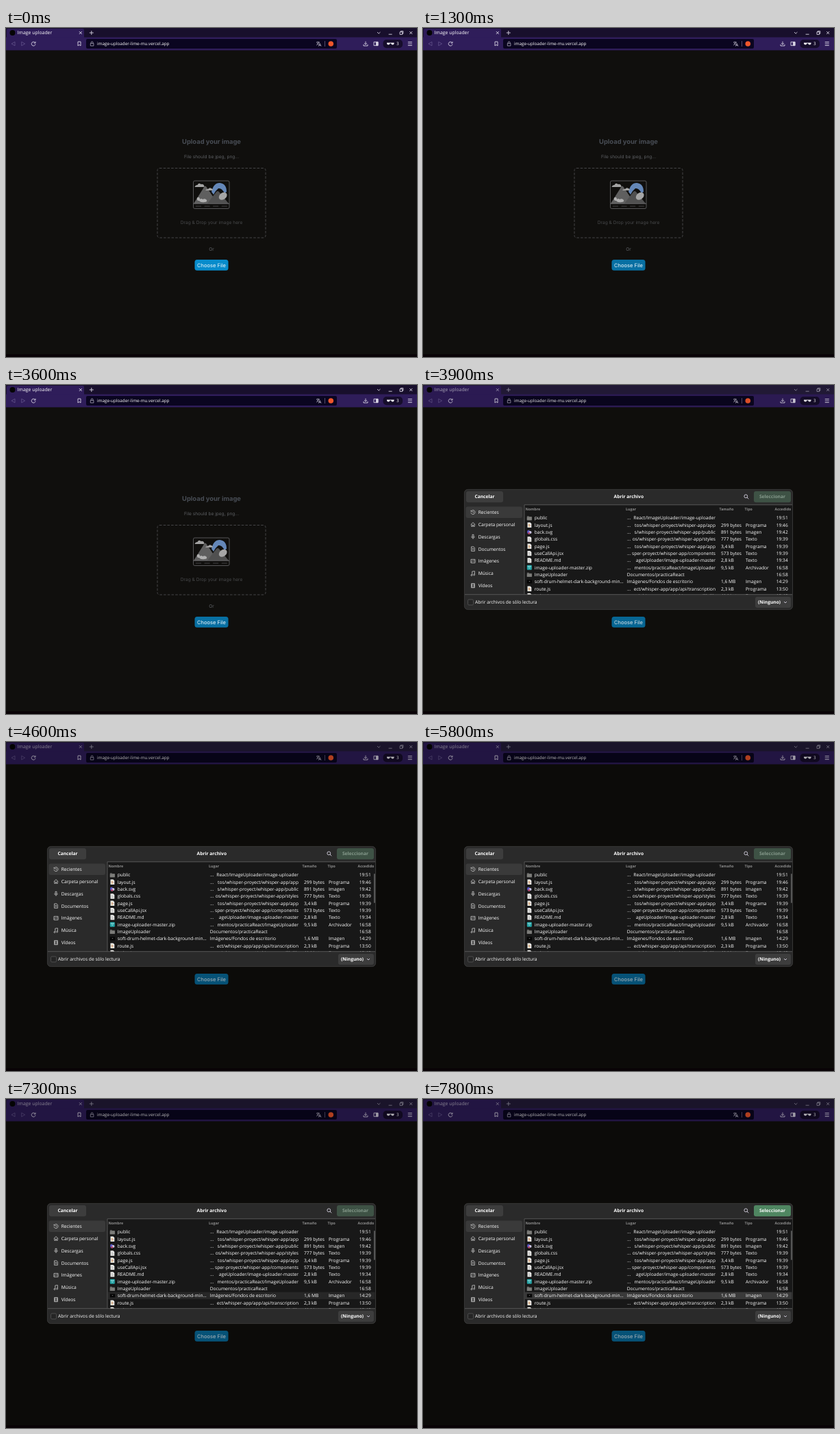
These frames come from a looping animation (600x480 px, 8000 ms). An HTML page:

```html
<!DOCTYPE html>
<html lang="es">
<head>
<meta charset="utf-8">
<title>Image uploader</title>
<style>
html, body { margin: 0; width: 100%; height: 100%; overflow: hidden; background: #100f0d; }
svg { display: block; width: 600px; height: 480px; }
text { font: 500 6.7px "Open Sans", "Noto Sans", sans-serif; text-rendering: geometricPrecision; fill: #fff; }
.bold { font-weight: 700; }
.head { font-size: 5.3px; font-weight: 700; fill: #8c8c8c; }
.page text { font: 6.6px Inter, sans-serif; text-anchor: middle; fill: #5d5f63; }
.mid { text-anchor: middle; }
.end { text-anchor: end; }
.line { fill: none; stroke: #d8d4e4; stroke-width: .9; }
.side .line { stroke: #c8c8c8; stroke-width: .8; }
</style>
</head>
<body>
<svg viewBox="0 0 600 480">
  <defs>
    <clipPath id="list"><rect x="148" y="175" width="391" height="130.5"/></clipPath>
    <g id="folder"><path d="M0 1h2.6l.8 .8H7V7H0Z" fill="#6a6a68"/><path d="M0 2.8h7V7H0Z" fill="#7d7d7a"/></g>
    <g id="doc"><path d="M.7 0h4l1.8 1.8V7.4H.7Z" fill="#ececea"/><path d="M2 2.4h2M2 3.9h3.2M2 5.4h3.2" stroke="#9a9a9a" stroke-width=".6"/></g>
    <g id="script"><path d="M.7 0h4l1.8 1.8V7.4H.7Z" fill="#ececea"/><path d="M2 2.6h2M2 5.6h2.4" stroke="#d8a13c" stroke-width=".8"/><path d="M2 4.1h3.2" stroke="#b5593f" stroke-width=".7"/></g>
    <g id="vector"><path d="M.4 1.6 3.6 .6V6.6L.4 5.4Z" fill="#5a55c8"/><circle cx="4.7" cy="4" r="2" fill="#c9c6e6"/><circle cx="3" cy="5.3" r="1.5" fill="#b8486a"/></g>
    <g id="zip"><rect y=".2" width="7" height="7" rx="1" fill="#23a3a5"/><path d="M1 2.4h5M2.6 4.6h1.8" stroke="#d4f2f0" stroke-width=".8"/></g>
    <g id="thumb"><rect y="1.2" width="7.4" height="5" fill="#050505"/><path d="M3 3.4h1.4" stroke="#999" stroke-width=".8"/></g>
  </defs>

  <rect width="600" height="480" fill="#100f0d"/>
  <rect y="476" width="600" height="4" fill="#090306"/>

  <!-- browser bar -->
  <rect id="strip" width="600" height="14"/>
  <path d="M1 14V3q0-2 2-2H112q2 0 2 2V14Z" fill="#2f1d5a"/>
  <rect y="13.5" width="600" height="19" fill="#2f1d5a"/>
  <rect x="117" y="16" width="366" height="14" rx="2" fill="#0a0520"/>
  <circle cx="9.5" cy="7" r="4" fill="#050505"/>
  <text id="tab" x="16.6" y="9.4" style="font-size:6.9px">Image uploader</text>
  <text x="133" y="25.2" style="font-size:6.35px">image-uploader-lime-mu.vercel.app</text>
  <g class="line">
    <path d="M13 20.2v5.6L8 23ZM22.7 20.2v5.6l5-2.8Z" stroke="#64558c" stroke-width=".8"/>
    <path d="M42.6 21.6A2.9 2.9 0 1 0 43 23.6M43 19.8v2.2h-2.3"/>
    <path d="M105 20h4v6l-2-1.6-2 1.6Z"/>
    <path d="M123.3 22.4h4.6v3.6h-4.6ZM124.2 22.4v-1.2a1.4 1.4 0 0 1 2.8 0v1.2" stroke="#a9a5b8" stroke-width=".8"/>
    <path d="M453 20.8h5M455.5 19.8v1M457 21q-1 2.6-3.8 4M454 21.8q1 1.7 2.6 2.5M456.4 26.6l1.8-4 1.8 4M457 25.3h2.4" stroke-width=".7"/>
    <path d="M465.5 19v8" stroke="#686080" stroke-width=".8"/>
    <path d="M525 19.6v4.2M523 22.2l2 2 2-2M522 24v2h6v-2"/>
    <path d="M537 20.4h6v5.2h-6Z"/><path d="M540.4 20.4h2.6v5.2h-2.6Z" fill="#d8d4e4"/>
    <path d="M586.8 20.5h6M586.8 23h6M586.8 25.5h6"/>
    <path id="controls" d="M106.8 5l4 4m0-4l-4 4M121.8 7h6M124.8 4v6M542 6l2.2 2.2L546.4 6M558.6 9.2h5M575 5.8h3.6v3.6h-3.6ZM576.2 5.8v-1.2h3.6v3.6h-1.2M589.2 5l4 4m0-4l-4 4"/>
  </g>
  <circle cx="474.3" cy="23" r="3.8" fill="#f0562b"/>
  <rect x="550.5" y="17" width="28.5" height="12.2" rx="5" fill="#160d2b"/>
  <path d="M556 21.6h10.6v1.2q-.4 1.8-2.2 1.8t-2.3-2h-1.6q-.5 2-2.3 2t-2.2-1.8Z" fill="#f2f0f6"/>
  <text x="570" y="25.3" style="font-size:6.3px">3</text>

  <!-- upload page -->
  <g class="page">
    <text x="300" y="168.8" style="font-size:9.4px;font-weight:700;fill:#484d55">Upload your image</text>
    <text x="300" y="190.2">File should be jpeg, png...</text>
    <rect x="221" y="204.5" width="158" height="101.5" rx="3" fill="none" stroke="#444446" stroke-dasharray="3.6 2.1"/>
    <path d="M274 256 288 234q2.5-7 6 0L309 256Z" fill="#5f5f5f"/>
    <path d="M294 256 307 239q2-2 4 0L325 256Z" fill="#505050"/>
    <path d="M300 239q3-13 12-13 10 1 10 13l-3 2q-4-8-9-7-5 4-7 9Z" fill="#6487b8"/>
    <path d="M275.5 232q1-3 4-3 2-4 5-1 4-1 5 3 0 1-1 1Z" fill="#a3a3a3"/>
    <path d="M291 237q1-2 4-2 2-3 5-1 2 1 2 3Z" fill="#a3a3a3"/>
    <ellipse cx="316.7" cy="245.3" rx="6.5" ry="4.8" transform="rotate(-38 316.7 245.3)" fill="#a6a6a6"/>
    <path d="M279 250q-1-3 2-3 2 0 2 3 2-2 4 0 4-2 6 1 1 3-3 3-6 1-8-2-3 0-3-2Z" fill="#b0b0b0"/>
    <rect x="273.5" y="223" width="52.5" height="40.5" rx="2" fill="none" stroke="#68686a" stroke-width=".8"/>
    <path d="M274 256.3h52" stroke="#77777a" stroke-width=".8"/>
    <path d="M277 260h46" stroke="#4c4c4e" stroke-width=".8" stroke-dasharray="8 4.6"/>
    <text x="300" y="285.7" style="fill:#48494b">Drag &amp; Drop your image here</text>
    <text x="300" y="324.8">Or</text>
    <rect id="choose" x="275.5" y="338" width="49" height="15.7" rx="3.5"/>
    <text x="300" y="348.7" style="font-size:7.5px;fill:#f0f8fc">Choose File</text>
  </g>
  <rect id="dim" width="600" height="476"/>

  <!-- file dialog -->
  <g id="dialog">
    <rect x="60.4" y="152.4" width="479.2" height="175.2" rx="5" fill="#2a2a2a" stroke="#404040" stroke-width=".8"/>
    <rect x="148" y="175" width="391" height="130.5" fill="#181818"/>
    <path d="M539 174.8H148V305.5M61 305.7H539" fill="none" stroke="#5c5c5c" stroke-width=".9"/>
    <rect x="63" y="155" width="54" height="16.2" rx="3" fill="#3d3d3d"/>
    <text class="bold mid" x="90" y="165.4">Cancelar</text>
    <text class="bold mid" x="300.3" y="165.4">Abrir archivo</text>
    <g class="line"><circle cx="471.3" cy="162.3" r="2.4"/><path d="M473 164l2.3 2.3"/></g>
    <rect id="ok" x="483" y="155" width="54" height="16.2" rx="3"/>
    <text id="okText" class="bold mid" x="510" y="165.4">Seleccionar</text>
    <rect x="62.5" y="177.5" width="82.5" height="16.5" rx="3" fill="#3a3a3a"/>
    <g id="side" class="side"></g>
    <g clip-path="url(#list)">
      <rect id="picked" x="148.5" y="281.7" width="390" height="10.3" fill="#3a3a3a"/>
      <g id="rows"></g>
    </g>
    <rect id="scroll" x="537" y="192" width="1.8" height="43" rx=".9" fill="#5c5c5c"/>
    <rect x="65.5" y="313" width="8" height="8" rx="1.5" fill="#252525" stroke="#565656" stroke-width=".8"/>
    <text x="76" y="319.3">Abrir archivos de sólo lectura</text>
    <rect x="485" y="309" width="52" height="16" rx="3" fill="#3d3d3d"/>
    <text class="bold" x="489" y="319.3">(Ninguno)</text>
    <path class="line" d="M527 316l2 2 2-2"/>
  </g>
</svg>
<script>
const $ = id => document.getElementById(id);
const label = (x, y, text, cls = '') => `<text x="${x}" y="${y}" class="${cls}">${text}</text>`;

// Icon paths are drawn around their own centre.
const places = [
  ['Recientes', 'M-2.6-1.5A3 3 0 1 1-3 .5M-3-2.8v1.6h1.6M0-1.6V.2L1.3 1'],
  ['Carpeta personal', 'M-3.2 .2 0-2.8 3.2 .2M-2.2-.4V3H-.7V1H.7V3H2.2V-.4'],
  ['Descargas', 'M-1-3H1V.4H-1ZM-2.3-.2Q-2 2 0 2T2.3-.2M0 2V3.4'],
  ['Documentos', 'M-2.4-3.2H1L2.4-1.8V3.2H-2.4ZM-1.2-.6H1.2M-1.2 1H1.2'],
  ['Imágenes', 'M-3-2.6H3V2.6H-3ZM-3 1.6-1-.6 0 .4 1.5-.8 3 .6'],
  ['Música', 'M-1.2 2V-2.8L2.4-3.2V1.4M-1.2 2a1 1 0 1 1-1.6 0a1 1 0 0 1 1.6 0M2.4 1.4a1 1 0 1 1-1.6 0a1 1 0 0 1 1.6 0'],
  ['Vídeos', 'M-2.4-3H2.4V3H-2.4ZM-1.2-3V3M1.2-3V3M-2.4 0H-1.2M1.2 0H2.4']
];
$('side').innerHTML = places.map(([name, icon], i) => {
  const y = 185.6 + i * 17.85;
  return `<path class="line" transform="translate(73 ${y})" d="${icon}"/>` + label(80.7, y + 2.4, name);
}).join('');

// icon | name | place (leading ~ means shortened) | size | type | time
const files = `
folder|public|~React/ImageUploader/image-uploader|||19:51
script|layout.js|~tos/whisper-proyect/whisper-app/app|299 bytes|Programa|19:46
vector|back.svg|~s/whisper-proyect/whisper-app/public|891 bytes|Imagen|19:42
doc|globals.css|~os/whisper-proyect/whisper-app/styles|777 bytes|Texto|19:39
script|page.js|~tos/whisper-proyect/whisper-app/app|3,4 kB|Programa|19:39
doc|useCallApi.jsx|~sper-proyect/whisper-app/components|573 bytes|Texto|19:39
doc|README.md|~ageUploader/image-uploader-master|2,8 kB|Texto|19:34
zip|image-uploader-master.zip|~mentos/practicaReact/ImageUploader|9,5 kB|Archivador|16:58
folder|ImageUploader|Documentos/practicaReact|||16:58
thumb|soft-drum-helmet-dark-background-min…|Imágenes/Fondos de escritorio|1,6 MB|Imagen|14:29
script|route.js|~ect/whisper-app/app/api/transcription|2,3 kB|Programa|13:50
script|index.js|~s/whisper-proyect/whisper-app/lib/lib|414 bytes|Programa|13:45`;

const heads = [[149.5, 'Nombre'], [296, 'Lugar'], [432.5, 'Tamaño'], [469.5, 'Tipo'], [513.5, 'Accedido']];
$('rows').innerHTML = heads.map(([x, name]) => label(x, 183.2, name, 'head')).join('') +
  files.trim().split('\n').map((row, i) => {
    const [icon, name, place, size, type, time] = row.split('|');
    const y = 196.3 + i * 10.32;
    const where = place[0] === '~'
      ? label(298, y, '…') + label(427, y, place.slice(1), 'end')
      : label(297.7, y, place);
    return `<use href="#${icon}" x="151.8" y="${y - 6}"/>` + label(162.7, y, name) + where +
      label(435, y, size) + label(471, y, type) + label(515.7, y, time);
  }).join('');

const ramp = (t, from, to) => Math.min(1, Math.max(0, (t - from) / (to - from)));
const mix = (a, b, p) => `rgb(${a.map((v, i) => Math.round(v + (b[i] - v) * p))})`;
const start = performance.now();

function draw() {
  const t = Math.floor((performance.now() - start) % 8000 / 100) * 100;
  $('choose').style.fill = mix([8, 140, 204], [8, 112, 163], ramp(t, 400, 900));

  // The browser loses focus, then darkens behind the dialog.
  const blur = ramp(t, 3600, 3800);
  $('strip').style.fill = mix([24, 15, 44], [36, 28, 58], blur);
  $('tab').style.opacity = $('controls').style.opacity = 1 - .35 * blur;
  $('dim').style.opacity = .27 * ramp(t, 3700, 4300);

  const open = ramp(t, 3600, 3850) ** .5;
  $('dialog').style.opacity = open;
  $('dialog').setAttribute('transform', `translate(0 ${240 * (1 - open)}) scale(1 ${open})`);
  $('scroll').style.opacity = ramp(t, 3900, 4100);

  $('picked').style.opacity = .45 * ramp(t, 7000, 7200) + .55 * ramp(t, 7400, 7600);
  const ready = ramp(t, 7400, 7700);
  $('ok').style.fill = mix([62, 82, 69], [79, 134, 97], ready);
  $('okText').style.fill = mix([134, 154, 140], [250, 250, 250], ready);
  requestAnimationFrame(draw);
}
draw();
</script>
</body>
</html>
```
